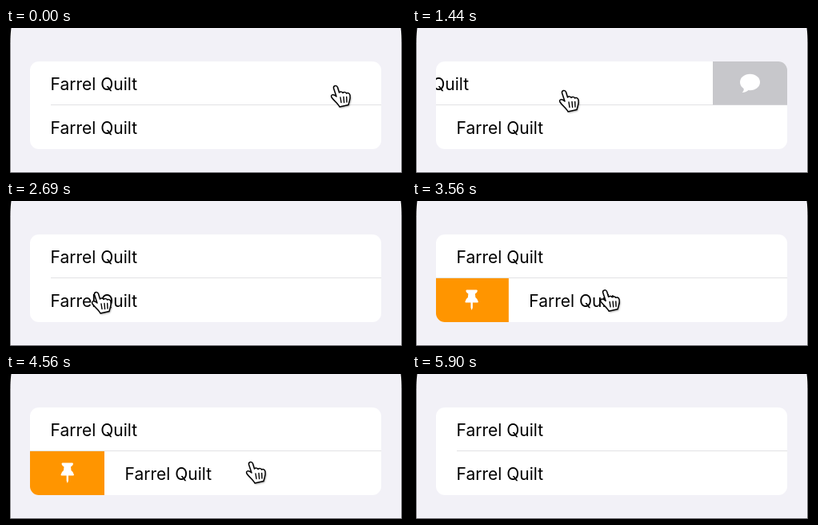
Animation, 500 px wide and 182 px high, one loop 5.99 s. Source, as an HTML page:

```html
<!DOCTYPE html>
<html lang="en">
<head>
<meta charset="utf-8">
<title>Swipe actions</title>
<style>
html, body { margin: 0; width: 100%; height: 100%; overflow: hidden; background: #000; }
svg { display: block; }
text { font: 21px Inter, Roboto, sans-serif; }
</style>
</head>
<body>
<svg width="500" height="182" viewBox="0 0 500 182">
  <defs>
    <clipPath id="card"><rect x="30" y="42" width="439" height="110" rx="11"/></clipPath>
    <filter id="soft" x="-30%" y="-30%" width="160%" height="170%"><feGaussianBlur stdDeviation="1"/></filter>
    <path id="hand" d="M4.500 4.500C4 1 8.500 .500 9.500 3.500L11.500 10C13 8.500 15.500 9 16 10.500C17.500 9 20 9.500 20.500 11C22.500 10 24.500 11 25 13.500C26 18 24 21 23 25.500L12 28C10.500 24 5 20.500 2 16C.500 13 3.500 11 8 15Z"/>
  </defs>
  <rect width="500" height="182"/>
  <path fill="#f2f1f7" d="M6.500 0Q5.400 8 5.400 20V181H494.500V20Q494.500 8 493.500 0Z"/>
  <path fill="#68676c" d="M5 181H495V182H5Z"/>

  <g clip-path="url(#card)">
    <rect x="30" y="42" width="439" height="110" fill="#fff"/>
    <text id="name1" x="55.500" y="77.500">Farrel Quilt</text>
    <text id="name2" x="55.500" y="132.500">Farrel Quilt</text>
    <rect id="line" y="96" height="1" fill="#e2e2e4"/>
    <g id="reply">
      <rect x="469" y="42" width="94" height="54.500" fill="#c7c7cb"/>
      <g fill="#fff">
        <ellipse cx="515.500" cy="68" rx="12.500" ry="10.300"/>
        <path d="M507 73Q509 79 505.500 81Q511 81 514.500 77Z"/>
      </g>
    </g>
    <g id="pin">
      <rect x="-63" y="97" width="93" height="55" fill="#ff9500"/>
      <path fill="#fff" d="M-22.500 111.500H-10Q-9 111.500 -9 113Q-9.500 115 -12 116.500L-11.500 121Q-8.500 123 -8 126.500Q-8 127.500 -9 127.500H-15V134L-16.200 137L-17.400 134V127.500H-23.500Q-24.500 127.500 -24.500 126.500Q-24 123 -21 121L-20.500 116.500Q-23 115 -23.500 113Q-23.500 111.500 -22.500 111.500Z"/>
    </g>
  </g>

  <g id="cursor">
    <use href="#hand" x="1" y="1.500" opacity=".4" filter="url(#soft)"/>
    <use href="#hand" fill="#fff" stroke="#000" stroke-width="1.500" stroke-linejoin="round"/>
    <path d="M13 16L14 22.500M17 15.500L17.600 22.500M20.700 15.500L21 22" fill="none" stroke="#000" stroke-width="1.400" stroke-linecap="round"/>
  </g>
</svg>
<script>
const LOOP = 5990, STEP = LOOP / 96, HIDE = 5860, OPEN = 93;
const $ = id => document.getElementById(id);
const move = (id, x, y = 0) => $(id).setAttribute("transform", `translate(${x} ${y})`);

// eased 0 to 1 between two times
function ease(t, from, to) {
  const u = Math.min(1, Math.max(0, (t - from) / (to - from)));
  return u * u * (3 - 2 * u);
}

function draw(now) {
  const t = Math.floor(now % LOOP / STEP) * STEP;

  // each row slides open, then shut
  const left = OPEN * (ease(t, 200, 650) - ease(t, 1560, 2300));
  const right = OPEN * (ease(t, 3220, 3590) - ease(t, 4940, 5400));
  move("name1", -left);
  move("reply", -left);
  move("name2", right);
  move("pin", right);

  const start = left + right > 0.5 ? 30 : 56;
  $("line").setAttribute("x", start);
  $("line").setAttribute("width", 469 - start);

  // drag left, drag back, go down a row, drag right, drag back
  const drop = ease(t, 2230, 2600), pull = ease(t, 3190, 3790);
  const x = 405 - 222 * ease(t, 130, 907) + 100 * ease(t, 1500, 2230)
    - 177 * drop + 193 * pull - 99 * ease(t, 4940, 5450);
  const y = 71 + 6 * ease(t, 650, 1300) + 36 * drop - 4 * pull;
  move("cursor", x, y);
  $("cursor").style.display = t > HIDE ? "none" : "";
}

let begin;
function frame(now) {
  begin ??= now;
  draw(now - begin);
  requestAnimationFrame(frame);
}
draw(0);
requestAnimationFrame(frame);
</script>
</body>
</html>
```
